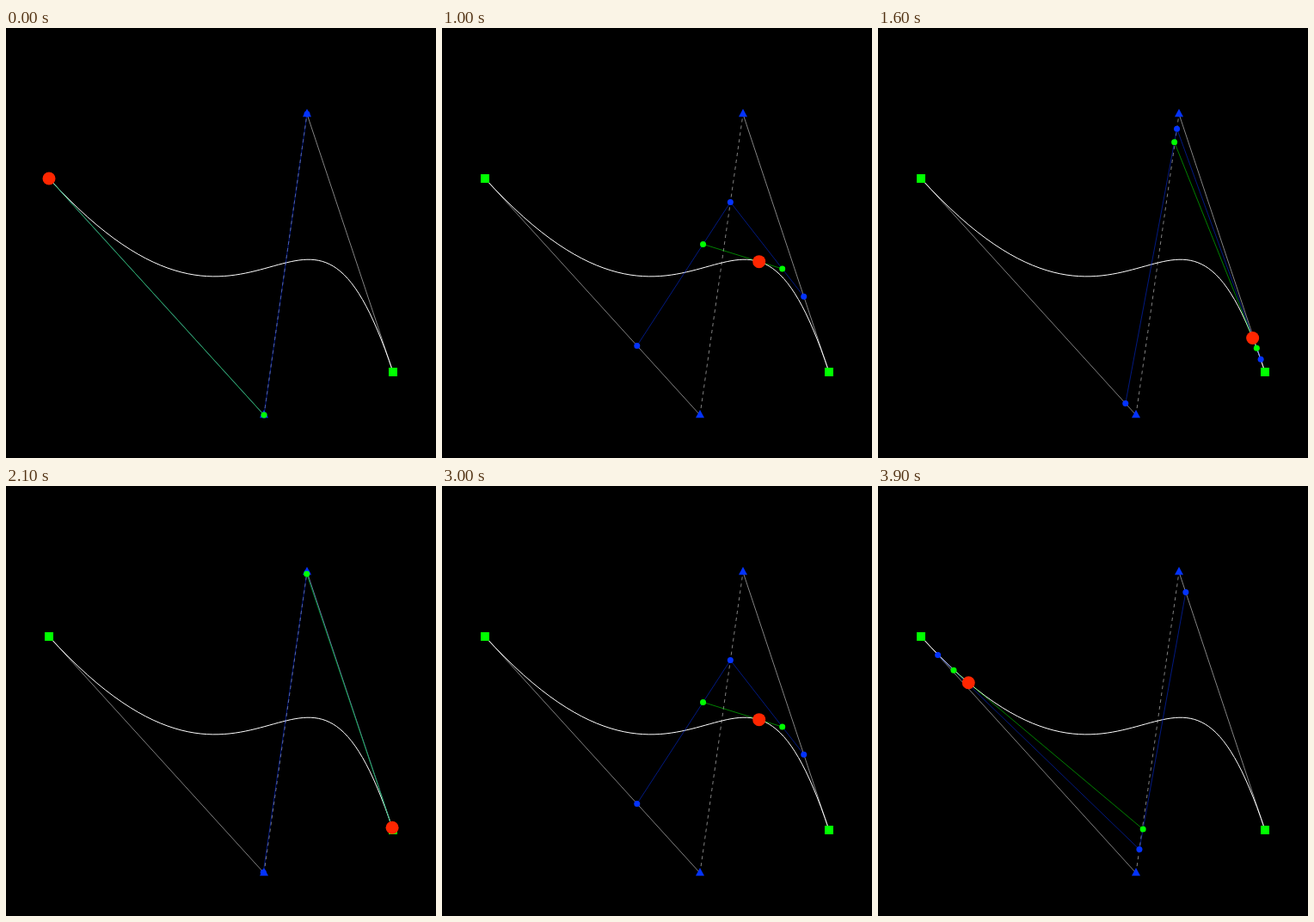
An HTML page that plays this animation: 500x500 px, repeating every 4000 ms.

```html
<!DOCTYPE html>
<html lang="en">
<head>
<meta charset="utf-8">
<title>Cubic Bézier construction</title>
<style>
html, body { margin: 0; width: 100%; height: 100%; overflow: hidden; background: #000; }
svg { display: block; width: 100vw; height: 100vh; }
.line { fill: none; stroke-width: 1; }
.frame { stroke: #fff; stroke-opacity: .5; }
.curve { stroke: #fff; }
.first { stroke: #0433ff; stroke-opacity: .5; }
.second { stroke: #0f0; stroke-opacity: .5; }
.blue { fill: #0433ff; }
.green { fill: #0f0; }
.red { fill: #ff2600; }
</style>
</head>
<body>
<svg id="stage" viewBox="0 0 500 500"></svg>
<script>
const LOOP = 4000, STEP = 100;
const P = [[50, 175], [300, 450], [350, 100], [450, 400]];
const stage = document.getElementById('stage');

function add(tag, cls, attrs = {}) {
  const el = document.createElementNS('http://www.w3.org/2000/svg', tag);
  el.setAttribute('class', cls);
  for (const k in attrs) el.setAttribute(k, attrs[k]);
  return stage.appendChild(el);
}
const path = (cls, d, extra) => add('path', 'line ' + cls, { d, ...extra });
const dots = (n, cls, r) => Array.from({ length: n }, () => add('circle', cls, { r }));
const mix = (a, b, t) => a.map((v, i) => v + (b[i] - v) * t);
const reduce = (pts, t) => pts.slice(1).map((p, i) => mix(pts[i], p, t));
const poly = pts => 'M' + pts.join('L');

path('frame', poly([P[0], P[1]]));
path('frame', poly([P[1], P[2]]), { 'stroke-dasharray': '4 4' });
path('frame', poly([P[2], P[3]]));
path('curve', `M${P[0]}C${P.slice(1).join(' ')}`);

const firstLines = [path('first', ''), path('first', '')];
const secondLine = path('second', '');

for (const [x, y] of [P[0], P[3]])
  add('rect', 'green', { x: x - 5, y: y - 5, width: 10, height: 10 });
for (const [x, y] of [P[1], P[2]])
  add('path', 'blue', { d: `M${x} ${y - 6}l5 9.3h-10z` });

const blue = dots(3, 'blue', 3.5);
const green = dots(2, 'green', 3.5);
const red = dots(1, 'red', 7.5);

function place(els, pts) {
  els.forEach((el, i) => {
    el.setAttribute('cx', pts[i][0]);
    el.setAttribute('cy', pts[i][1]);
  });
}

function draw(ms) {
  const time = Math.floor((ms % LOOP) / STEP) * STEP;
  const t = Math.sin(Math.PI * time / LOOP);
  const a = reduce(P, t), b = reduce(a, t), c = reduce(b, t);
  firstLines.forEach((el, i) => el.setAttribute('d', poly([a[i], a[i + 1]])));
  secondLine.setAttribute('d', poly(b));
  place(blue, a);
  place(green, b);
  place(red, c);
}

let start;
function tick(now) {
  start ??= now;
  draw(Math.max(0, now - start));
  requestAnimationFrame(tick);
}
draw(0);
requestAnimationFrame(tick);
</script>
</body>
</html>
```
